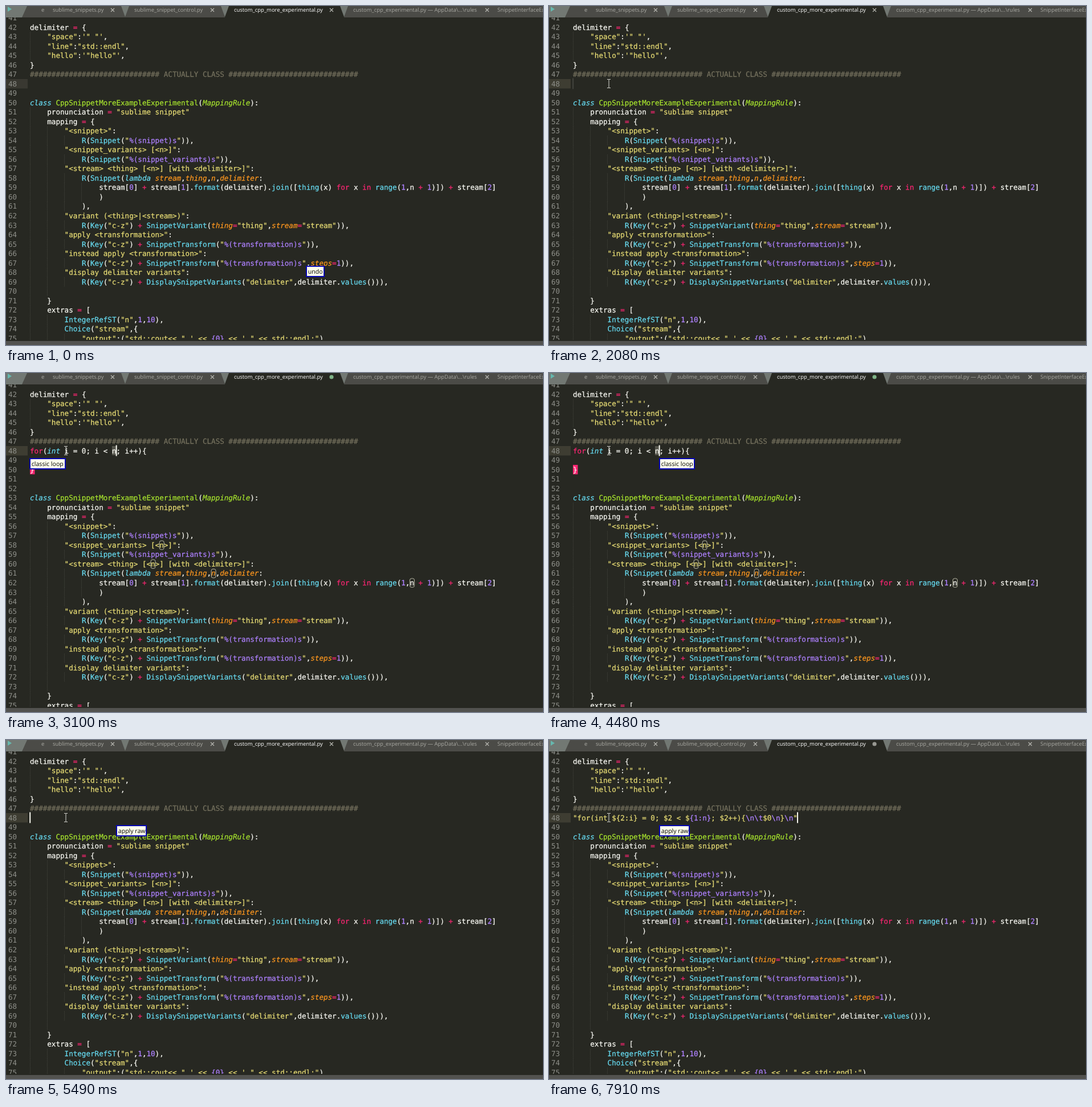
An HTML page for the animation above (8 s loop, 942 px wide and 594 px high).

```html
<!DOCTYPE html>
<html lang="en">
<head>
<meta charset="utf-8">
<title>Editor snippets</title>
<style>
  html, body { margin: 0; width: 100%; height: 100%; overflow: hidden; background: #272822; }
  svg { display: block; width: 942px; height: 594px; }
  text { white-space: pre; text-rendering: geometricPrecision; }
  .code { font: 12.58px "DejaVu Sans Mono", monospace; color: #f8f8f2; }
  .code, .code tspan { fill: currentColor; stroke: currentColor; stroke-width: 0.25; }
  .gutter { color: #8f908a; stroke: none; }
  .ui { font: 9.45px "Open Sans", sans-serif; }
  .tip { font: 10.56px "Open Sans", sans-serif; fill: #000; }
  .comment { color: #75715e; }
  .string { color: #e6db74; }
  .base { color: #a6e22e; font-style: italic; }
  .type { color: #a6e22e; }
  .decl { color: #66d9ef; font-style: italic; }
  .keyword, .op { color: #f92672; }
  .call { color: #66d9ef; }
  .param { color: #fd971f; font-style: italic; }
  .number { color: #ae81ff; }
  .guide { stroke: #45463f; stroke-dasharray: 1 1; }
  .match { fill: none; stroke: #b9b9a6; }
</style>
</head>
<body>
<svg viewBox="0 0 942 594">
  <defs><clipPath id="view"><rect y="19" width="942" height="566"/></clipPath></defs>
  <rect width="942" height="594" fill="#272822"/>
  <g clip-path="url(#view)">
    <rect id="activeLine" y="128" width="38" height="16.5"/>
    <g id="numbers"></g>
    <g id="head"></g>
    <g id="tail"></g>
    <g id="loopCode"></g>
    <g id="rawCode"></g>
  </g>
  <g id="tabs"></g>
  <rect y="587" width="942" height="7" fill="#52524f"/>
  <rect id="caret" y="126.5" width="2" height="19" fill="#f8f8f0"/>
  <g id="tip">
    <rect id="tipBox" height="18" fill="#ffffec" stroke="#0808b4" stroke-width="2"/>
    <text id="tipText" class="tip"></text>
  </g>
  <circle id="click" cx="103" cy="135" r="11" fill="#a39a14"/>
  <path id="mouse" d="M-3-7.5h2.5l.5.5.5-.5H3M0-7V7M-3 7.5h2.5L0 7l.5.5H3" fill="none" stroke="#dcdcd6"/>
</svg>
<script>
const LOOP = 8000, LEFT = 42, CHAR = 7.573, LINE = 16.52;
const $ = id => document.getElementById(id);
const colX = col => LEFT + col * CHAR;
const baseline = line => 41.6 + (line - 42) * LINE;
const escape = s => s.replace(/&/g, "&amp;").replace(/</g, "&lt;");
const show = (id, on) => $(id).setAttribute("visibility", on ? "visible" : "hidden");

const headLines = `delimiter = {
    "space":'" "',
    "line":"std::endl",
    "hello":'"hello"',
}
${"#".repeat(30)} ACTUALLY CLASS ${"#".repeat(30)}`;

const tailLines = `
class CppSnippetMoreExampleExperimental(MappingRule):
    pronunciation = "sublime snippet"
    mapping = {
        "<snippet>":
            R(Snippet("%(snippet)s")),
        "<snippet_variants> [<n>]":
            R(Snippet("%(snippet_variants)s")),
        "<stream> <thing> [<n>] [with <delimiter>]":
            R(Snippet(lambda stream,thing,n,delimiter:
                stream[0] + stream[1].format(delimiter).join([thing(x) for x in range(1,n + 1)]) + stream[2]
                )
            ),
        "variant (<thing>|<stream>)":
            R(Key("c-z") + SnippetVariant(thing="thing",stream="stream")),
        "apply <transformation>":
            R(Key("c-z") + SnippetTransform("%(transformation)s")),
        "instead apply <transformation>":
            R(Key("c-z") + SnippetTransform("%(transformation)s",steps=1)),
        "display delimiter variants":
            R(Key("c-z") + DisplaySnippetVariants("delimiter",delimiter.values())),
        \n    }
    extras = [
        IntegerRefST("n",1,10),
        Choice("stream",{
            "output":("std::cout<< " ' << {0} << ' " << std::endl;")`;

const syntax = new RegExp([
  /(?<comment>#.*)/,
  /(?<string>"std::cout.*"|'[^']*'|"[^"]*")/,
  /(?<plain>(?<=int) .*)/,
  /(?<base>MappingRule)/,
  /(?<type>(?<=class )\w+)/,
  /(?<decl>\b(?:class|lambda|int)\b)/,
  /(?<keyword>\b(?:for|in)\b)/,
  /(?<call>\w+(?=\())/,
  /(?<param>(?<=lambda.*)\w+|\w+(?==))/,
  /(?<number>\b\d+\b)/,
  /(?<op>[=+])/,
  /(?<other>\w+|\S)/
].map(r => r.source).join("|"), "g");
const placeholder = /(%\(\w+\)s|\{\d(?::n)?\}|\\[nt])/;

function tokens(line) {
  const out = [];
  for (const m of line.matchAll(syntax)) {
    const kind = Object.keys(m.groups).find(k => m.groups[k] !== undefined);
    let col = m.index;
    const parts = kind === "string" ? m[0].split(placeholder) : [m[0]];
    parts.forEach((part, i) => {
      if (part) out.push([col, i % 2 ? "number" : kind, part]);
      col += part.length;
    });
  }
  return out;
}

function codeLine(line, n) {
  const y = baseline(n), indent = line.search(/\S|$/);
  let guides = "";
  for (let col = 0; col < indent; col += 4) {
    const x = Math.floor(colX(col)) + 0.5;
    guides += `<path class="guide" d="M${x} ${y - 12.5}v${LINE}"/>`;
  }
  const spans = tokens(line).map(([col, kind, s]) =>
    `<tspan class="${kind}" x="${colX(col).toFixed(2)}">${escape(s)}</tspan>`).join("");
  return `${guides}<text class="code" y="${y}">${spans}</text>`;
}

const block = (source, first) =>
  source.split("\n").map((line, i) => codeLine(line, first + i)).join("");

const matchBox = ([line, col]) =>
  `<rect class="match" x="${colX(col)}" y="${baseline(line) - 12}" width="8" height="15.5" rx="3"/>`;

$("numbers").innerHTML = Array.from({ length: 35 }, (_, i) =>
  `<text class="code gutter" x="4" y="${baseline(41 + i)}">${41 + i}</text>`).join("");
$("head").innerHTML = block(headLines, 42);
$("tail").innerHTML = block(tailLines, 49);
$("loopCode").innerHTML =
  `<rect x="${colX(19)}" y="128" width="${CHAR}" height="16" fill="#55554c"/>
   <rect x="${LEFT}" y="161" width="8.5" height="16.5" fill="#f92672"/>` +
  block("for(int i = 0; i < n; i++){\n\n}", 48) +
  [[58, 30], [60, 28], [61, 42], [62, 88]].map(matchBox).join("");
$("rawCode").innerHTML = block(String.raw`"for(int ${"${2:i}"} = 0; $2 < ${"${1:n}"}; $2++){\n\t$0\n}\n"`, 48);

const label = (x, s, fill = "#a9a9a3") => `<text class="ui" x="${x}" y="10" fill="${fill}">${s}</text>`;
const cross = (x, id = "") => `<path id="${id}" d="M${x - 3} 4l6 6m0-6l-6 6" stroke="#b4b4ae" stroke-width="1.3"/>`;
const gap = x => `M${x - 7} 0h14l-7 19z`;
$("tabs").innerHTML = `
  <rect width="942" height="20" fill="#4b4b47"/>
  <path d="M384 20V0H593V20Z" fill="#272822"/>
  <path d="M0 0H37L28 20H0Z${[209, 384, 593].map(gap).join("")}" fill="#727873"/>
  <path d="M3 1L10 5.5L3 10Z" fill="#66b8ae"/>` +
  label(62, "e") +
  label(82, "sublime_snippets.py") + cross(187) +
  label(225, "sublime_snippet_control.py") + cross(362) +
  label(400, "custom_cpp_more_experimental.py", "#fff") + cross(571, "close") +
  `<circle id="dirty" cx="571" cy="7" r="3.6"/>` +
  label(609, "custom_cpp_experimental.py — AppData\\...\\rules") + cross(844) +
  label(862, "SnippetInterfaceExample.py");

// [time, opacity] pairs of the blinking caret
const blink = [
  [0, 0], [1379, 0], [1380, 1], [1700, 1], [1900, 0], [2070, 0], [2150, 1], [2380, 1], [2470, 0],
  [3099, 0], [3100, 1], [3400, 1], [3720, 0], [4080, 0], [4170, 1], [4500, 1], [4860, 0],
  [5160, 0], [5250, 1], [5960, 1], [6200, 0], [6550, 0], [6700, 1], [7040, 1], [7200, 0],
  [7640, 0], [7900, 1], [8000, 1]
];
// start, x, y, width and words; a bare start hides the tip
const tips = [
  [0, 527, 456, 31, "undo"], [1700], [2780, 42, 150, 62, "classic loop"],
  [4480, 194, 150, 61, "classic loop"], [5490, 194, 150, 52, "apply raw"]
];

function sample(keys, t) {
  const i = keys.findIndex(k => k[0] > t);
  const [t0, a] = keys[i - 1], [t1, b] = keys[i];
  return a + (b - a) * (t - t0) / (t1 - t0);
}

function drawTip(t) {
  const [, x, y, width, words] = tips.filter(k => k[0] <= t).pop();
  show("tip", words);
  if (!words) return;
  const box = $("tipBox");
  box.setAttribute("x", x);
  box.setAttribute("y", y);
  box.setAttribute("width", width);
  const text = $("tipText");
  text.setAttribute("x", x + 2.8);
  text.setAttribute("y", y + 12.8);
  if (text.textContent !== words) text.textContent = words;
}

function draw(t) {
  const loop = t >= 3100 && t < 5490, raw = t >= 5560;
  show("loopCode", loop);
  show("rawCode", raw);
  $("tail").setAttribute("transform", `translate(0 ${loop ? 3 * LINE : 0})`);
  show("close", !loop && !raw);
  show("dirty", loop || raw);
  $("dirty").setAttribute("fill", loop ? "#7fb387" : "#989892");
  $("activeLine").setAttribute("fill", t < 1380 ? "#393831" : "#3e3d32");

  $("caret").setAttribute("x", colX(loop ? 20 : raw ? 52 : 0) - 0.8);
  $("caret").setAttribute("opacity", sample(blink, t));
  drawTip(t);

  const p = Math.min(1, Math.max(0, (t - 130) / 700));
  const ease = p * p * (3 - 2 * p);
  show("mouse", t >= 130);
  $("mouse").setAttribute("transform", `translate(${810.5 - 705.5 * ease} ${574 - 438 * ease})`);
  show("click", t >= 1310 && t < 1480);
}

const start = performance.now();
function tick() {
  draw((performance.now() - start) % LOOP);
  requestAnimationFrame(tick);
}
tick();
</script>
</body>
</html>
```
